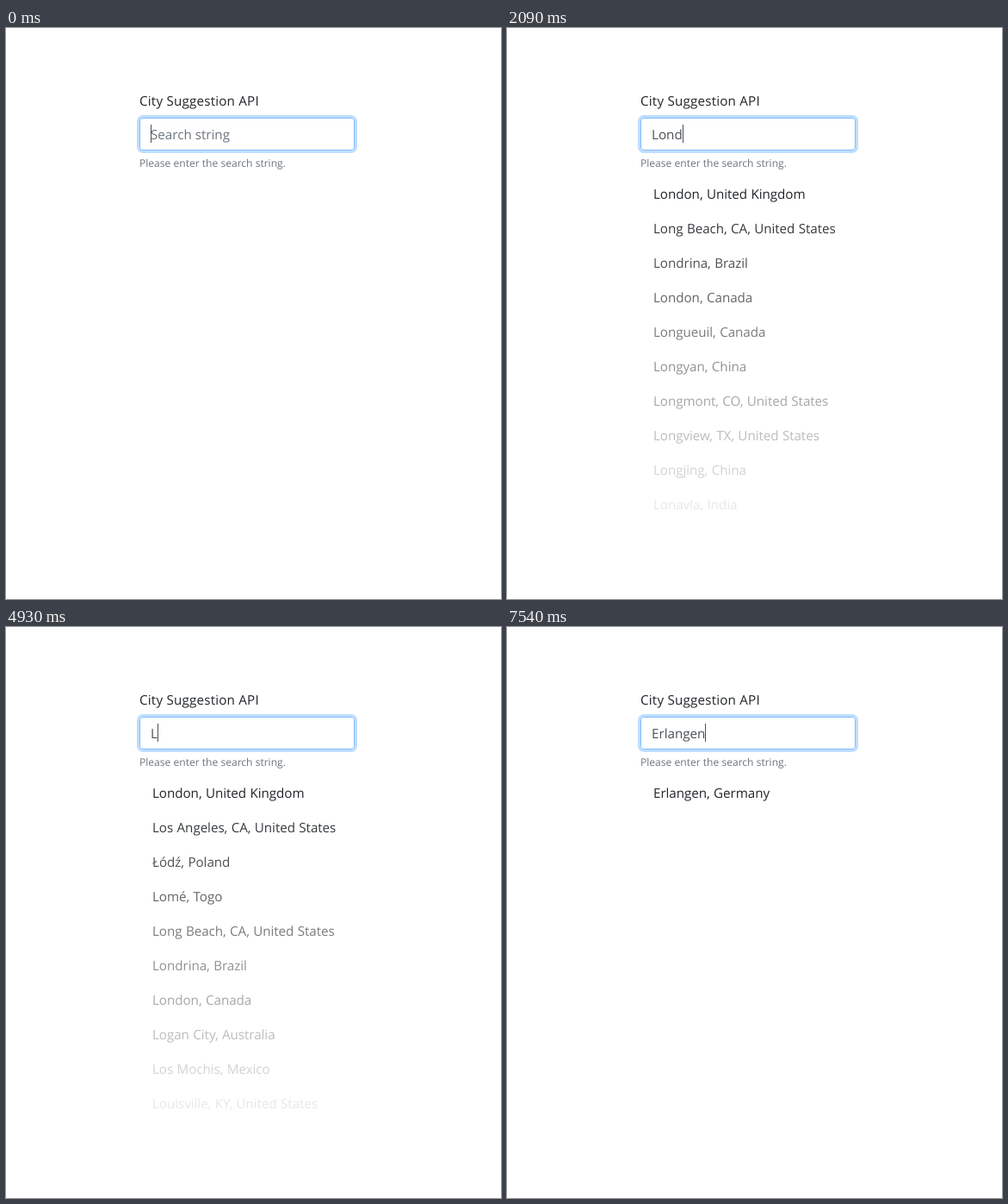
Animation, 575 px wide and 662 px high, one loop 8 s. Source, as an HTML page:

```html
<!DOCTYPE html>
<html lang="en">
<head>
<meta charset="utf-8">
<title>City Suggestion API</title>
<style>
  html, body { margin: 0; width: 100%; height: 100%; overflow: hidden; background: #fff; }
  svg { display: block; }
  text { font: 15.2px "Open Sans", "Noto Sans", sans-serif; fill: #212529; text-rendering: geometricPrecision; white-space: pre; }
  #title { letter-spacing: .2px; }
  #help { font-size: 12.08px; }
  #list { letter-spacing: -.05px; word-spacing: .5px; }
  #help, #value.empty { fill: #6c757d; }
  #value, #caret { fill: #495057; }
</style>
</head>
<body>
<svg width="575" height="662" viewBox="0 0 575 662">
  <text id="title" x="155" y="90">City Suggestion API</text>
  <rect x="153.5" y="102.5" width="253" height="41" rx="5.5" fill="none" stroke="#bfdeff" stroke-width="3"/>
  <rect x="155.5" y="104.5" width="249" height="37" rx="3.5" fill="#fff" stroke="#80bdff"/>
  <text id="value" x="168" y="129"></text>
  <rect id="caret" y="112" width="1" height="21"/>
  <text id="help" x="155" y="161">Please enter the search string.</text>
  <g id="list"></g>
</svg>
<script>
const LOOP = 8000;
const US = ', United States', UK = 'London, United Kingdom', DE = ', Germany';

// Suggestions per query
const cities = {
  '': [],
  L: ['Lagos, Nigeria', UK, 'Lima, Peru', 'Lahore, Pakistan', 'Los Angeles, CA' + US,
    'Lanzhou, China', 'Luanda, Angola', 'Lucknow, India', 'Lusaka, Zambia', 'Ludhiana, India'],
  Lo: [UK, 'Los Angeles, CA' + US, 'Łódź, Poland', 'Lomé, Togo', 'Long Beach, CA' + US,
    'Londrina, Brazil', 'London, Canada', 'Logan City, Australia', 'Los Mochis, Mexico', 'Louisville, KY' + US],
  Lon: [UK, 'Long Beach, CA' + US, 'Londrina, Brazil', 'London, Canada', 'Longueuil, Canada',
    'Longyan, China', 'Longmont, CO' + US, 'Longview, TX' + US, 'Longjing, China', 'Lonavla, India'],
  Lond: [UK, 'Londrina, Brazil', 'London, Canada', 'Londonderry County Borough, United Kingdom', 'Londonderry, NH' + US,
    'London, OH' + US, 'London, KY' + US, 'Londontowne, MD' + US, 'Londonderry, Australia', 'London, CA' + US],
  Londo: [UK, 'London, Canada', 'Londonderry County Borough, United Kingdom', 'Londonderry, NH' + US, 'London, OH' + US,
    'London, KY' + US, 'Londontowne, MD' + US, 'Londonderry, Australia', 'London, CA' + US, 'London Village, Kiribati'],
  E: ['Ecatepec de Morelos, Mexico', 'Erbil, Iraq', 'Edmonton, Canada', 'Enugu, Nigeria', 'El Paso, TX' + US,
    'Essen' + DE, 'Ebute Ikorodu, Nigeria', 'Esenler, Turkey', 'Eskişehir, Turkey', 'East London, South Africa'],
  Er: ['Erbil, Iraq', 'Erzurum, Turkey', 'Erfurt' + DE, 'Erode, India', 'Erzincan, Turkey',
    'Erlangen' + DE, 'Ergani, Turkey', 'Erie, PA' + US, 'Ermelo, South Africa', 'Ercolano, Italy'],
  Erl: ['Erlangen' + DE, 'Erlanger, KY' + US, 'Erlensee' + DE, 'Erlenbach am Main' + DE, 'Erlenbach' + DE,
    'Erlenbach, Switzerland', 'Erlau' + DE, 'Erlen, Switzerland', 'Erlands Point-Kitsap Lake, WA' + US, 'Erligheim' + DE],
  Erla: ['Erlangen' + DE, 'Erlanger, KY' + US, 'Erlau' + DE, 'Erlands Point-Kitsap Lake, WA' + US],
  Erlang: ['Erlangen' + DE, 'Erlanger, KY' + US],
  Erlangen: ['Erlangen' + DE]
};

// [time, typed text, query whose results are listed]
const steps = [
  [0, '', ''], [1000, 'L', ''], [1100, 'L', 'L'], [1430, 'Lo', 'L'], [1650, 'Lo', 'Lo'],
  [1750, 'Lon', 'Lon'], [2090, 'Lond', 'Lon'], [2310, 'Lond', 'Lond'], [2430, 'Londo', 'Lond'],
  [2640, 'Londo', 'Londo'], [2740, 'London', 'Londo'], [3290, 'Londo', 'Londo'],
  [3740, 'Lond', 'Londo'], [3840, 'Lond', 'Lond'], [4170, 'Lon', 'Lond'], [4270, 'Lon', 'Lon'],
  [4600, 'Lo', 'Lon'], [4710, 'Lo', 'Lo'], [4930, 'L', 'Lo'], [5140, 'L', 'L'],
  [5250, '', 'L'], [5360, '', ''], [5790, 'E', ''], [5890, 'E', 'E'], [6430, 'Er', 'E'],
  [6670, 'Er', 'Er'], [6880, 'Erl', 'Er'], [6990, 'Erla', 'Erl'], [7200, 'Erlan', 'Erla'],
  [7310, 'Erlang', 'Erla'], [7430, 'Erlange', 'Erlang'], [7540, 'Erlangen', 'Erlangen']
];
const caretOff = [[550, 1000], [6330, 6430]];

const [value, caret, list] = ['value', 'caret', 'list'].map(id => document.getElementById(id));
const rows = Array.from({ length: 10 }, (_, i) => {
  const row = document.createElementNS('http://www.w3.org/2000/svg', 'text');
  row.setAttribute('x', 170);
  row.setAttribute('y', 198 + 40 * i);
  row.setAttribute('opacity', 1 - i / 10);
  return list.appendChild(row);
});

let shown;
function draw(now) {
  const t = now % LOOP;
  const step = steps.findLast(([start]) => start <= t);
  if (step !== shown) {
    const [, typed, query] = shown = step;
    value.textContent = typed || 'Search string';
    value.classList.toggle('empty', !typed);
    caret.setAttribute('x', 168 + (typed ? Math.round(value.getComputedTextLength()) : 0));
    rows.forEach((row, i) => row.textContent = cities[query][i] || '');
  }
  const hidden = caretOff.some(([from, to]) => t >= from && t < to);
  caret.setAttribute('visibility', hidden ? 'hidden' : 'visible');
  requestAnimationFrame(draw);
}
draw(performance.now());
</script>
</body>
</html>
```
